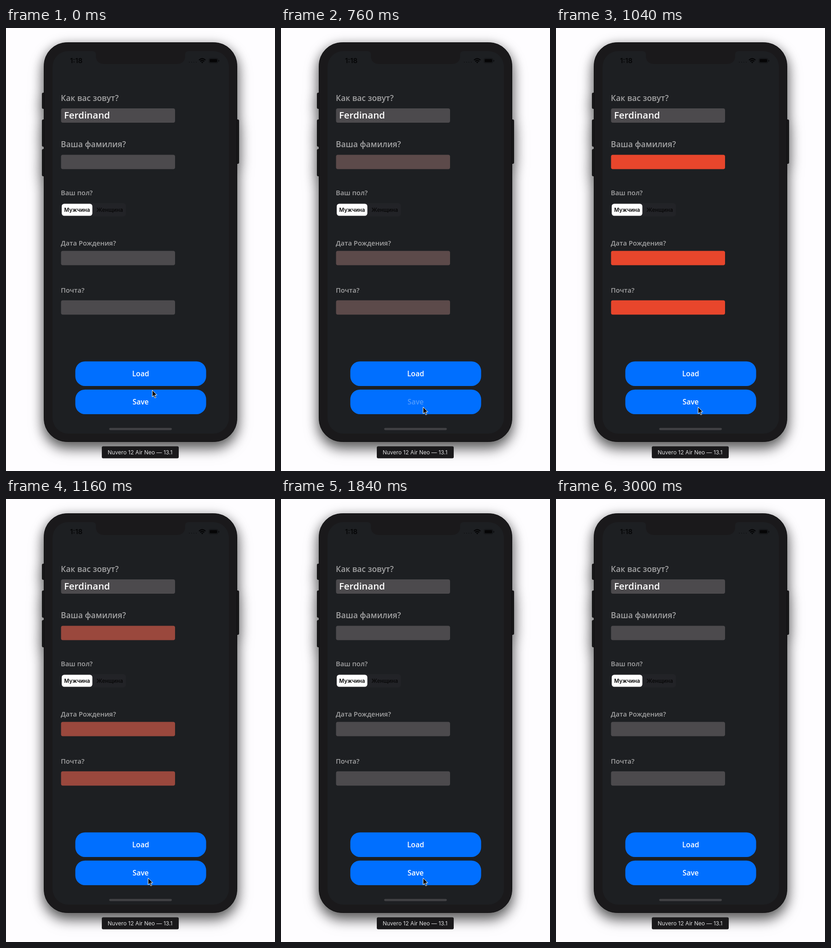
An HTML page for the animation above (3.04 s loop, 584 by 959 pixels).

```html
<!DOCTYPE html>
<html lang="ru">
<head>
<meta charset="utf-8">
<title>Form validation</title>
<style>
html, body { margin: 0; width: 100%; height: 100%; overflow: hidden; background: #fefdff; }
svg { display: block; width: 584px; height: 959px; }
.body { filter: drop-shadow(0 13px 14px rgba(0, 0, 0, .58)) drop-shadow(0 3px 12px rgba(0, 0, 0, .22)); }
.field { fill: #4c4a4d; }
.label { fill: #a2a2a3; }
.button { fill: #006fff; }
.label, .white { font-family: "Open Sans", "Noto Sans", sans-serif; font-weight: 600; }
.white { fill: #fff; }
.system { font-family: Inter, Roboto, sans-serif; font-weight: 600; }
.mid { text-anchor: middle; }
</style>
</head>
<body>
<svg viewBox="0 0 584 959">
  <g class="body" fill="#1a191b">
    <g stroke="#0c0c0d">
      <rect x="78.5" y="140.5" width="8" height="34" rx="2"/>
      <rect x="78.5" y="198.5" width="8" height="58" rx="2"/>
      <rect x="78.5" y="262.5" width="8" height="58" rx="2"/>
      <rect x="497.500" y="198.500" width="8" height="95" rx="2"/>
      <rect x="82.500" y="31.500" width="419" height="864" rx="50"/>
    </g>
  </g>
  <rect x="101" y="50" width="383" height="828" rx="34" fill="#1d1f22"/>
  <path d="M187 50q8 0 8 7v2q0 19 19 19h156q19 0 19-19v-2q0-7 8-7z" fill="#1a191b"/>

  <g fill="#050506">
    <text class="system" x="139" y="76" font-size="15">1:18</text>
    <g opacity=".45">
      <circle cx="398" cy="74" r="1"/><circle cx="403" cy="74" r="1"/>
      <circle cx="408" cy="74" r="1"/><circle cx="413" cy="74" r="1"/>
    </g>
    <g fill="none" stroke="#050506" stroke-width="2.300">
      <path d="M419 69.500q7-6.500 14 0"/>
      <path d="M421.700 72.300q4.300-4 8.600 0"/>
    </g>
    <path d="M426 76.500l-2.300-2.500q2.300-2 4.600 0z"/>
    <rect x="440.500" y="65.800" width="19.500" height="10" rx="3" fill="none" stroke="#111214"/>
    <rect x="442" y="67.300" width="16.500" height="7" rx="1.700"/>
    <path d="M461.500 69v4q1.500-.5 1.500-2t-1.500-2z"/>
  </g>

  <g class="label" font-size="17.400">
    <text x="119" y="157.500">Как вас зовут?</text>
    <text x="119" y="258">Ваша фамилия?</text>
  </g>
  <g class="label" font-size="14.600">
    <text x="119" y="362">Ваш пол?</text>
    <text x="119" y="471">Дата Рождения?</text>
    <text x="119" y="573">Почта?</text>
  </g>

  <rect class="field" x="119.500" y="174" width="247.500" height="31" rx="4"/>
  <text class="white" x="126" y="196" font-size="20.400">Ferdinand</text>
  <g class="field" id="empty">
    <rect x="119.500" y="274.500" width="247.500" height="31" rx="4"/>
    <rect x="119.500" y="482.500" width="247.500" height="31" rx="4"/>
    <rect x="119.500" y="589.500" width="247.500" height="31" rx="4"/>
  </g>

  <rect x="119.500" y="379" width="141" height="29" rx="6.500" fill="#222327"/>
  <rect x="121" y="380.500" width="66.500" height="26" rx="5.500" fill="#fff"/>
  <g class="system mid" font-size="11.800">
    <text x="154.300" y="398" fill="#0a0a0a">Мужчина</text>
    <text x="225.300" y="398" fill="#09090a">Женщина</text>
  </g>

  <rect class="button" x="150.500" y="721.700" width="284" height="53.300" rx="21"/>
  <rect class="button" x="150.500" y="782.700" width="284" height="53.300" rx="21"/>
  <g class="white mid" font-size="15.600">
    <text x="292.300" y="753.800">Load</text>
    <text x="292.300" y="814.800" id="save">Save</text>
  </g>
  <rect x="224" y="865.800" width="136" height="4.600" rx="2.300" fill="#414144"/>

  <rect x="208" y="905.500" width="167" height="26" rx="3" fill="#1a191b"/>
  <text class="system mid" x="291" y="923" font-size="12" fill="#dcdcdd" style="font-weight:400">Nuvero 12 Air Neo — 13.1</text>

  <path id="cursor" d="M0 0v14.500l3.300-3 2.400 5.400 2.400-1-2.400-5.300h4.600z" fill="#050505" stroke="#fff" stroke-linejoin="round"/>
</svg>
<script>
const LOOP = 3040, FRAME = 40;
const PRESS = 640, RELEASE = 712, FADE = 240, CLEAR = 1040;
const LEAVE = 1840, GONE = 2280;
const plain = [76, 74, 77], alert = [232, 70, 44];
const [empty, save, cursor] = ['empty', 'save', 'cursor'].map(id => document.getElementById(id));

const part = (t, start, length) => Math.min(1, Math.max(0, (t - start) / length));
const ease = p => p * p * (3 - 2 * p);
const mix = (a, b, p) => a + (b - a) * p;

function draw(t) {
  const lit = ease(part(t, RELEASE, FADE));
  const red = lit - ease(part(t, CLEAR, FADE));
  empty.style.fill = `rgb(${plain.map((c, i) => Math.round(mix(c, alert[i], red)))})`;
  save.style.opacity = t < PRESS ? 1 : mix(.22, 1, lit);

  const aim = ease(part(t, 0, 520));
  const exit = part(t, LEAVE, 400) ** 2;
  const x = mix(mix(317.5, 308.5, aim), 551, exit);
  const y = mix(mix(784, 820.5, aim), 765, exit);
  cursor.setAttribute('transform', `translate(${x} ${y})`);
  cursor.style.visibility = t < GONE ? 'visible' : 'hidden';
}

const origin = performance.now();
function tick() {
  const t = (performance.now() - origin) % LOOP;
  draw(Math.floor(t / FRAME) * FRAME);
  requestAnimationFrame(tick);
}
draw(0);
requestAnimationFrame(tick);
</script>
</body>
</html>
```
